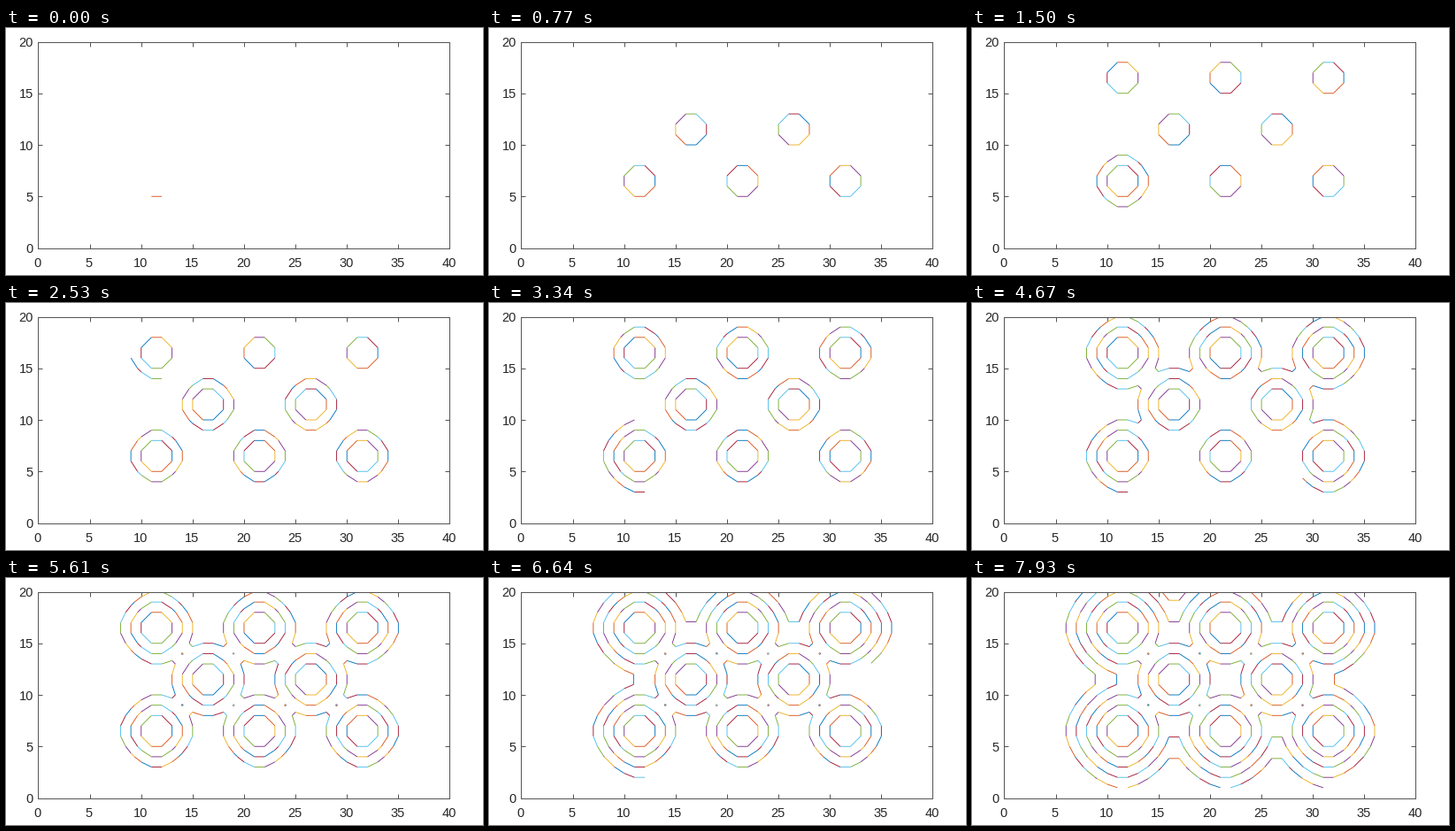
A matplotlib script that plays this animation: 539x279 px, repeating every 8 s.

```python
import math

import numpy as np
import matplotlib.pyplot as plt
from matplotlib.animation import FuncAnimation
from matplotlib.collections import LineCollection

W, H, DPI = 539, 279, 100
LEFT, TOP, RIGHT, BOTTOM = 36.49, 15.51, 501.49, 248.51
STEP, FRAMES = 40, 200
NX, NY = 40, 24          # the field runs on above the visible range
Y_MAX = 20
INK, FRAME_INK = "#262626", "#555555"
COLORS = ["#0072BD", "#D95319", "#EDB120", "#7E2F8E",
          "#77AC30", "#4DBEEE", "#A2142F"]
BLOCKS = [(11, 6), (21, 6), (31, 6), (16, 11), (26, 11),
          (11, 16), (21, 16), (31, 16)]


def px(points):
    return points * 72 / DPI


def solve(vals):
    """Upwind eikonal update from the accepted neighbours."""
    vals = sorted(vals)
    while True:
        n, s, q = len(vals), sum(vals), sum(v * v for v in vals)
        disc = s * s - n * (q - 1)
        if disc >= -1e-9:
            t = (s + math.sqrt(max(disc, 0))) / n
            if t >= vals[-1] - 1e-9:
                return t
        vals.pop()


def neighbours(x, y):
    for dx, dy in ((1, 0), (-1, 0), (0, 1), (0, -1)):
        if 1 <= x + dx <= NX and 1 <= y + dy <= NY:
            yield x + dx, y + dy


def arrival_times():
    """Fast marching from all blocks of 2 by 2 points."""
    trial = {(bx + i, by + j): 0.0
             for bx, by in BLOCKS for i in (0, 1) for j in (0, 1)}
    done = {}
    while trial:
        p = min(trial, key=trial.get)
        done[p] = trial.pop(p)
        for q in neighbours(*p):
            if q not in done and trial.get(q, 1) > 0:
                trial[q] = solve([done[r] for r in neighbours(*q) if r in done])
    return np.array([[done[x, y] for x in range(1, NX + 1)]
                     for y in range(1, NY + 1)])


def clean(line):
    """Drop repeated points, turn clockwise, start closed lines bottom left."""
    p = np.round(line, 4)
    p = p[np.r_[True, np.any(np.diff(p, axis=0) != 0, axis=1)]]
    closed = bool(np.all(p[0] == p[-1]))
    x, y = p.T
    if np.sum(x * np.roll(y, -1) - y * np.roll(x, -1)) > 0:
        p = p[::-1]
    if closed:
        p = p[:-1]
        low = min(range(len(p)), key=lambda i: (p[i][1], p[i][0]))
        p = np.roll(p, 1 - low, axis=0)
        p = np.vstack([p, p[:1]])
    return p, closed


def strokes_of(p):
    """Pen strokes of a line; the first one has no length."""
    return list(zip(np.vstack([p[:1], p[:-1]]), p))


def visible_runs(p):
    runs, run = [], []
    for a, b in strokes_of(p):
        if min(a[1], b[1]) < Y_MAX:
            run.append((a, b))
        elif run:
            runs.append(run)
            run = []
    return runs + [run] if run else runs


def trace(level):
    cs = ax.contour(np.arange(1, NX + 1), np.arange(1, NY + 1), field,
                    levels=[level + 1e-6])
    lines = [clean(s) for s in cs.allsegs[0] if len(s) > 1]
    cs.remove()
    rings = sorted((p for p, closed in lines if closed),
                   key=lambda p: (p[:, 1].min(), p[0][0]))
    runs = [strokes_of(p) for p in rings]
    loose = [r for p, closed in lines if not closed for r in visible_runs(p)]
    loose.sort(key=lambda r: min(b[0] for _, b in r))
    return [seg for r in runs + loose for seg in r]


fig = plt.figure(figsize=((W + .001) / DPI, (H + .001) / DPI), dpi=DPI,
                 facecolor="white")
ax = fig.add_axes([LEFT / W, 1 - BOTTOM / H,
                   (RIGHT - LEFT) / W, (BOTTOM - TOP) / H])
field = arrival_times()
levels = {k: trace(k) for k in range(1, 6)}
segments = [s for k in levels for s in levels[k]]


def upto(level, x, y):
    """Number of strokes drawn when the pen last reaches a point of a level."""
    total = sum(len(levels[k]) for k in range(1, level + 1))
    ends = np.array([b for _, b in levels[level]])[::-1]
    return total - int(np.argmin(np.hypot(ends[:, 0] - x, ends[:, 1] - y)))


PACE = [(0, 2), (800, upto(1, 10, 16)), (1480, upto(2, 12, 4)),
        (2520, upto(2, 9, 16)), (3320, upto(3, 11, 10)),
        (4060, upto(3, 28, 17)), (4640, upto(3, 29, 4.36)),
        (5700, upto(3, 29, 13.91)), (6640, upto(4, 34, 13.06)),
        (7320, upto(5, 6, 6)), (7920, upto(5, 31, 1))]
times, counts = zip(*PACE)

ax.set(xlim=(0, 40), ylim=(0, Y_MAX), facecolor="white")
ax.set_xticks(range(0, 41, 5))
ax.set_yticks(range(0, 21, 5))
ax.tick_params(direction="in", top=True, right=True, length=px(4.7),
               width=px(1), color=FRAME_INK, labelbottom=False, labelleft=False)
for spine in ax.spines.values():
    spine.set(linewidth=px(1), color=FRAME_INK)


def label(x, y, value, ha):
    fig.text(x / W, 1 - y / H, str(value), ha=ha, va="center", color=INK,
             family="Liberation Sans", fontsize=px(14.6))


for v in range(0, 41, 5):
    label(LEFT - .7 + (RIGHT - LEFT) * v / 40, 265.5, v, "center")
for v in range(0, 21, 5):
    label(31, BOTTOM + 1.5 - (BOTTOM - TOP) * v / 20, v, "right")

pen = LineCollection([], linewidths=px(.9), capstyle="butt", zorder=2)
pen.set_snap(False)
ax.add_collection(pen, autolim=False)


def draw(frame):
    n = int(round(np.interp(frame * STEP, times, counts)))
    pen.set_segments(segments[:n])
    pen.set_color([COLORS[i % 7] for i in range(n)])
    return pen,


def start():
    return draw(0)


anim = FuncAnimation(fig, draw, frames=FRAMES, init_func=start,
                     interval=STEP, repeat=True, repeat_delay=0, blit=False)
plt.show()
```
